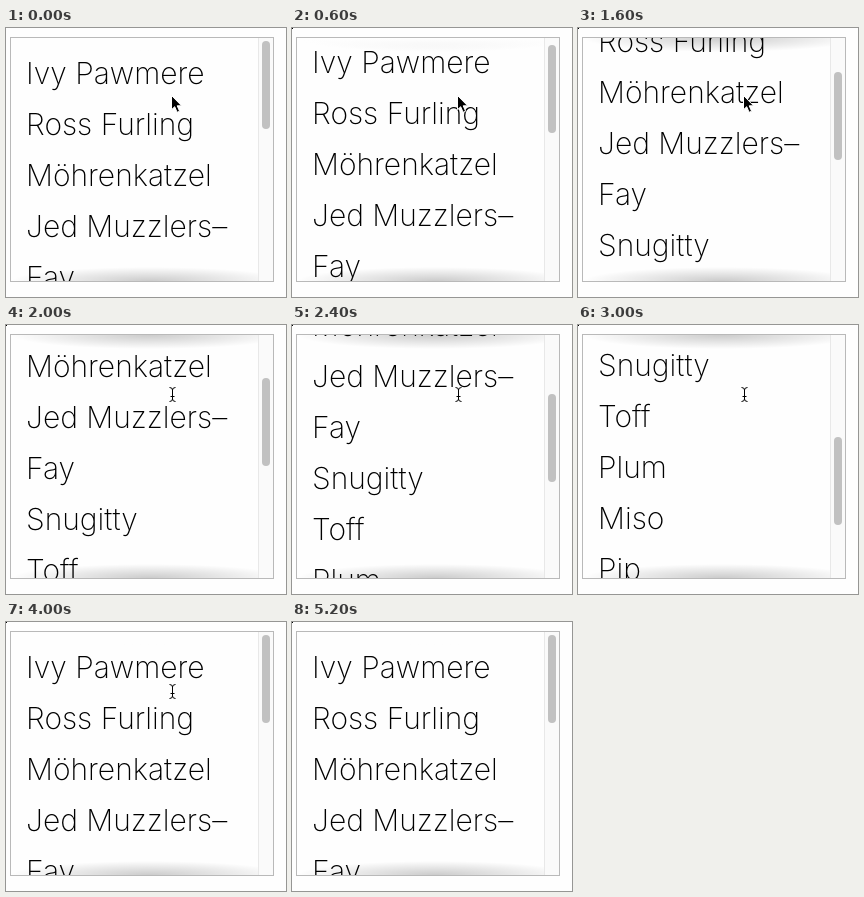
An HTML page for the animation above (5800 ms loop, 280x269 px).

```html
<!DOCTYPE html>
<html lang="en">
<head>
<meta charset="utf-8">
<title>Scrolling shadows</title>
<style>
  html, body { margin: 0; width: 100%; height: 100%; overflow: hidden; background: #fefefe; }
  div, svg { position: absolute; }
  #box {
    left: 4px; top: 9px; width: 262px; height: 243px;
    border: 1px solid #b9b9b9; overflow: hidden;
  }
  #view {
    width: 247px; height: 243px; overflow: hidden;
    background:
      radial-gradient(farthest-side at 56% 0, #0003, #0000) 0 0 / 100% 14px no-repeat,
      radial-gradient(farthest-side at 56% 100%, #0003, #0000) 0 100% / 100% 14px no-repeat;
  }
  /* Covers travel with the list and hide the shadow at either end. */
  #list {
    box-sizing: border-box; width: 247px; height: 632px; padding: 10px 0 10px 15px;
    font: 200 30px/51px Inter, Roboto, sans-serif; color: #000; white-space: pre;
    background:
      linear-gradient(#fefefe 30%, #fefefe00) 0 0 / 100% 40px no-repeat,
      linear-gradient(#fefefe00, #fefefe 70%) 0 100% / 100% 40px no-repeat;
  }
  #track { left: 247px; width: 14px; height: 243px; background: #fafafa; border-left: 1px solid #e8e8e8; }
  #thumb { left: 3px; top: 3px; width: 8px; height: 88px; border-radius: 4px; background: #c1c1c1; }
  #dot { width: 1px; height: 1px; background: #000; }
  svg { left: 0; top: 0; }
</style>
</head>
<body>
<div id="box">
  <div id="view"><div id="list"></div></div>
  <div id="track"><div id="thumb"></div></div>
</div>
<div id="dot"></div>
<svg width="280" height="269">
  <path id="arrow" d="M165.5 67.5v14.2l3.2-3 2.4 5.6 2.5-1.1-2.4-5.4h4.4z" fill="#000" stroke="#fff"/>
  <g id="beam" fill="none">
    <path d="M163.5 62.5q3 0 3 2.5q0-2.5 3-2.5M166.5 65v9M163.5 76.5q3 0 3-2.5q0 2.5 3 2.5M164.5 71.5h4" stroke="#000"/>
  </g>
</svg>
<script>
const LOOP = 5800;
const names = ["Ivy Pawmere", "Ross Furling", "Möhrenkatzel", "Jed Muzzlers–", "Fay", "Snugitty",
  "Toff", "Plum", "Miso", "Pip", "Paw7", "Button"];
// [time, scroll offset]; each position holds until the next
const steps = [[0, 0], [200, 1], [600, 11], [1000, 12], [1400, 42], [1600, 83], [2000, 106], [2200, 130],
  [2400, 147], [2800, 195], [3000, 260], [3200, 325], [3400, 373], [3800, 160], [4000, 0]];

const $ = id => document.getElementById(id);
const show = (id, on) => { $(id).style.visibility = on ? "visible" : "hidden"; };
const shiftY = (id, y) => { $(id).style.transform = `translateY(${y}px)`; };

$("list").textContent = names.join("\n");

function draw() {
  const t = performance.now() % LOOP;
  const scroll = steps.findLast(([start]) => start <= t)[1];
  shiftY("list", -scroll);
  shiftY("thumb", Math.floor(scroll * 0.383));
  show("dot", t >= 400);
  show("arrow", t < 2000);
  show("beam", t >= 2000 && t < 4800);
  requestAnimationFrame(draw);
}
draw();
</script>
</body>
</html>
```
